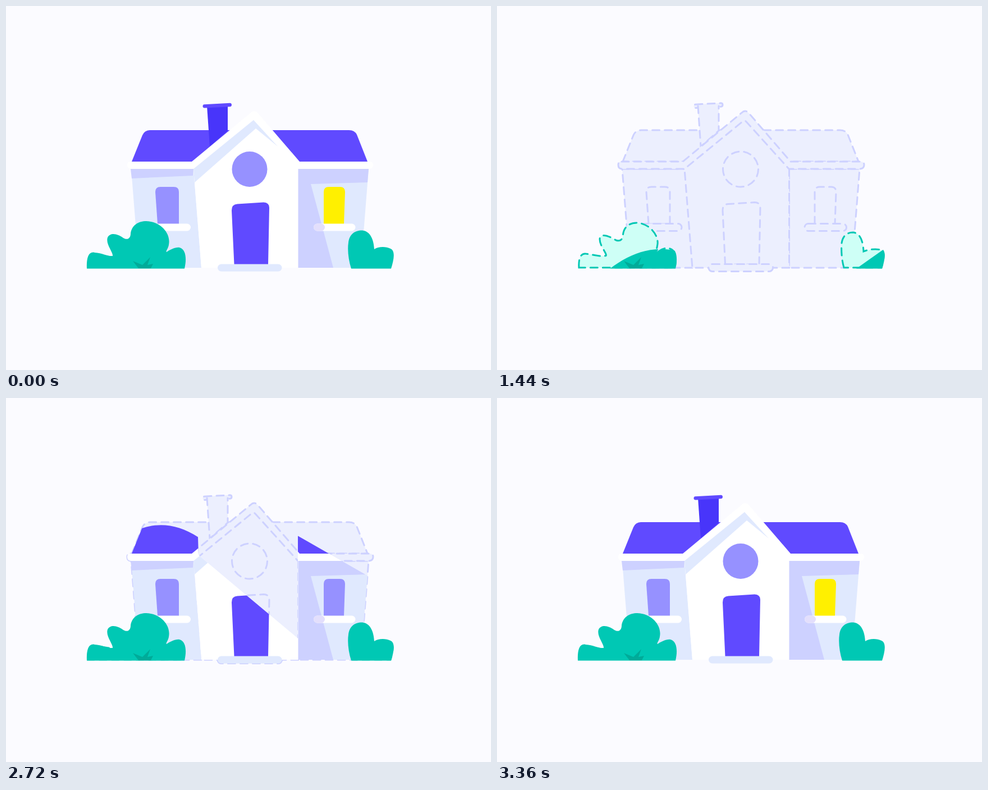
An HTML page that plays this animation: 864 by 648 pixels, repeating every 3480 ms.

```html
<!DOCTYPE html>
<html lang="en">
<head>
<meta charset="utf-8">
<title>House filling up</title>
<style>
  html, body { margin: 0; height: 100%; overflow: hidden; background: #fbfbff; }
  svg { display: block; width: 100%; height: 100%; }
  .wire { stroke-width: 3; stroke-linecap: round; stroke-dasharray: 13 9; }
</style>
</head>
<body>
<svg viewBox="0 0 864 648">
  <defs>
    <path id="roof" d="M224 277L243 230Q247 221 257 221H611Q621 221 625 229L644 277Z"/>
    <path id="chimney" d="M358 178L363 250L395 222V178"/>
    <path id="cap" d="M353 175.300L399 172.800Q402 173 402 176T399 179.200L354 181.500Q350.500 181.500 350.500 178.500T353 175.300Z"/>
    <path id="leftWall" d="M348 466H237L223 290H334"/>
    <path id="rightWall" d="M520.500 290H646L632 466H520.500Z"/>
    <path id="front" d="M334 286L441 196L520.500 284V466H348L334 290Z"/>
    <path id="trim" d="M222 277H331L436 190Q442 184 448 190L523 277H648Q654 277 654 283T647 290H520L445 207Q441 202 437 206L334 290H223Q216 290 216 283T222 277Z"/>
    <path id="leftPane" d="M270 388L266 331Q266 322 275 322H299Q308 322 308 331V388Z"/>
    <path id="rightPane" d="M566 388V331Q566 322 575 322H595Q604 322 604 331L602 388Z"/>
    <rect id="leftSill" x="250" y="387.500" width="79" height="13" rx="6.500"/>
    <rect id="rightSill" x="548" y="387.500" width="74.500" height="13" rx="6.500"/>
    <circle id="round" cx="434" cy="290.500" r="31.500"/>
    <path id="door" d="M406.500 460L402 364Q402 353 412 352.500L459 349.500Q469 350 469 359L467 460Z"/>
    <rect id="step" x="377" y="459.500" width="114.500" height="13" rx="6.500"/>
    <path id="drop" d="M232 348C222 342 216 331 221 328C228 325 233 332 232 348Z"/>
    <clipPath id="houseClip"><path id="houseFlow"/></clipPath>
    <clipPath id="bushClip"><path id="bushFlow"/></clipPath>
  </defs>

  <g id="wire" class="wire" fill="#eceffe" stroke="#cdd1ff">
    <use href="#roof"/><use href="#cap"/><use href="#chimney"/>
    <use href="#leftWall"/><use href="#rightWall"/><use href="#front"/><use href="#trim"/>
    <use href="#leftPane"/><use href="#rightPane"/><use href="#leftSill"/><use href="#rightSill"/>
    <use href="#round"/><use href="#door"/><use href="#step"/>
    <g fill="#cefff6" stroke="#00c8b4">
      <path d="M146 465.700C145 450 149 440 158 441C170 442 183 447 194 444.500C197 441 180 424 183.500 412C188 404 202 411 212 417C221 420 224 414 224.500 407C226 393 236 386 249 386C272 387 288 408 286 424C285 431 283 436 286 438C292 433 302 429 308 432C319 435 320 451 317 465.700Z"/>
      <path d="M618 465.700C614 452 613 436 614 422C616 408 625 403 634 403C646 404 652 416 653 437C662 433 675 432 684 434C692 437 689 452 685 465.700Z"/>
    </g>
  </g>

  <g id="solid">
    <g clip-path="url(#houseClip)">
      <g id="house">
        <use href="#roof" fill="#604aff"/>
        <use href="#chimney" fill="#4835fa"/>
        <use href="#cap" fill="#604aff"/>
        <use href="#leftWall" fill="#e0e9fe"/>
        <path fill="#cdd1ff" d="M222 290H334L333 302L224 307Z"/>
        <use href="#rightWall" fill="#e0e9fe"/>
        <path fill="#cdd1ff" d="M520 290H646L644 314L543 317L583 466H520Z"/>
        <use href="#leftPane" fill="#9691ff"/>
        <use href="#rightPane" id="lamp"/>
        <use href="#leftSill" fill="#fff"/>
        <use href="#rightSill" fill="#fff"/>
        <rect x="548" y="387.500" width="20" height="13" rx="6.500" fill="#e3dffc"/>
        <use href="#front" fill="#fff"/>
        <use href="#trim" fill="#fff"/>
        <path fill="#e0e9fe" d="M334 290L441 203L484 250L445 218L336 314Z"/>
        <use href="#round" fill="#9691ff"/>
        <use href="#door" fill="#604aff"/>
        <use href="#step" fill="#e0e9fe"/>
      </g>
    </g>
    <g clip-path="url(#bushClip)">
      <g id="bushes" fill="#00c8b4">
        <path d="M144 467.500C143 449 147 436 158 439C172 440 182 446 190 445C191 438 177 424 181 412C186 402 200 406 209 413C218 418 222 412 222 405C224 390 236 383 250 383C276 384 294 405 290 425C289 432 284 437 286 438C292 434 302 429 309 430C321 433 322 451 318 467.500Z"/>
        <path d="M615 467.500C610 452 608 434 610 421C612 405 623 399 635 399.500C648 401 655 414 656 433C663 428 677 428 685 432C694 436 691 452 686 467.500Z"/>
        <path fill="#00ab99" d="M226 454L243 461L257 447L252 461L262 459L258 467H236Z"/>
      </g>
    </g>
  </g>
  <path id="spike" fill="#00c8b4" d="M236 382C248 378 249 356 259 355C270 356 272 380 284 396Z"/>
  <use id="bushDrop" href="#drop" fill="#00c8b4"/>
  <use id="roofDrop" href="#drop" fill="#604aff"/>
</svg>
<script>
const LOOP = 3480, STEP = 40, GROUND = 467, FADED = 920;
const $ = id => document.getElementById(id);

// Columns of liquid: the level rises by `rise` as p^power while it sloshes and bulges.
const bushPools = [
  { x0: 142, x1: 322, low: 500, rise: 150, power: 2, slosh: 55, bulge: 52 },
  { x0: 608, x1: 693, low: 475, rise: 125, power: 2, slosh: 36, bulge: 0 }
];
const housePools = [
  { x0: 210, x1: 342, foot: 349, low: 490, rise: 400, power: 1.74, slosh: 0, bulge: 40 },
  { x0: 330, x1: 521, low: 508, rise: 400, power: 3.2, slosh: 80, bulge: 0 },
  { x0: 520, x1: 660, low: 483, rise: 293, power: 1.37, slosh: 40, bulge: 0 }
];

const ramp = (t, from, to) => Math.min(1, Math.max(0, (t - from) / (to - from)));

// A stretch that overshoots, dips below its rest size and settles.
function spring(t, from, to, size) {
  const q = ramp(t, from, to);
  return 1 + size * Math.sin(1.5 * Math.PI * q) * (1 - q);
}

function surface(p, { x0, x1, foot = x1, low, rise, power, slosh, bulge }) {
  const level = low - rise * p ** power;
  const tilt = slosh * Math.sin(2 * Math.PI * p);
  const crest = level - bulge * Math.sin(Math.PI * p);
  const third = (x1 - x0) / 3;
  return `M${x0} 480V${level + tilt}C${x0 + third} ${crest + tilt / 3} ` +
    `${x1 - third} ${crest - tilt / 3} ${x1} ${level - tilt}L${foot} 480Z`;
}

function fill(id, pools, p) {
  $(id).setAttribute("d", pools.map(pool => surface(p, pool)).join(""));
}

function scaleY(id, s, base = GROUND) {
  $(id).setAttribute("transform", `translate(0 ${base}) scale(1 ${s}) translate(0 ${-base})`);
}

// A drop flies up to the left and fades out.
function fly(id, q, x, y) {
  $(id).setAttribute("transform", `translate(${x + 4 - 12 * q} ${y + 10 - 30 * q})`);
  $(id).setAttribute("opacity", q ? 1 - q : 0);
}

function draw(t) {
  const fading = t < FADED;
  const flow = fading ? LOOP : t;   // the scene is full until it has faded
  const wire = ramp(t, 440, FADED) * (1 - ramp(t, 2840, 3040));
  const stretch = spring(t, 2720, 3200, .112);

  $("wire").setAttribute("opacity", wire);
  $("solid").setAttribute("opacity", fading ? 1 - wire : 1);
  $("lamp").setAttribute("fill", fading || t >= 3360 ? "#fff000" : "#9691ff");

  fill("bushFlow", bushPools, ramp(flow, 1200, 1900));
  fill("houseFlow", housePools, ramp(flow, 1880, 3000));

  scaleY("wire", stretch);
  scaleY("house", stretch);
  scaleY("bushes", stretch * spring(t, 1880, 2320, .13));
  scaleY("spike", Math.sin(Math.PI * ramp(t, 1860, 2060)), 396);
  fly("bushDrop", ramp(t, 1900, 2080), 0, 0);
  fly("roofDrop", ramp(t, 2940, 3120), 146, -212);
}

function tick() {
  const t = performance.now() % LOOP;
  draw(Math.floor(t / STEP) * STEP);
  requestAnimationFrame(tick);
}
tick();
</script>
</body>
</html>
```
